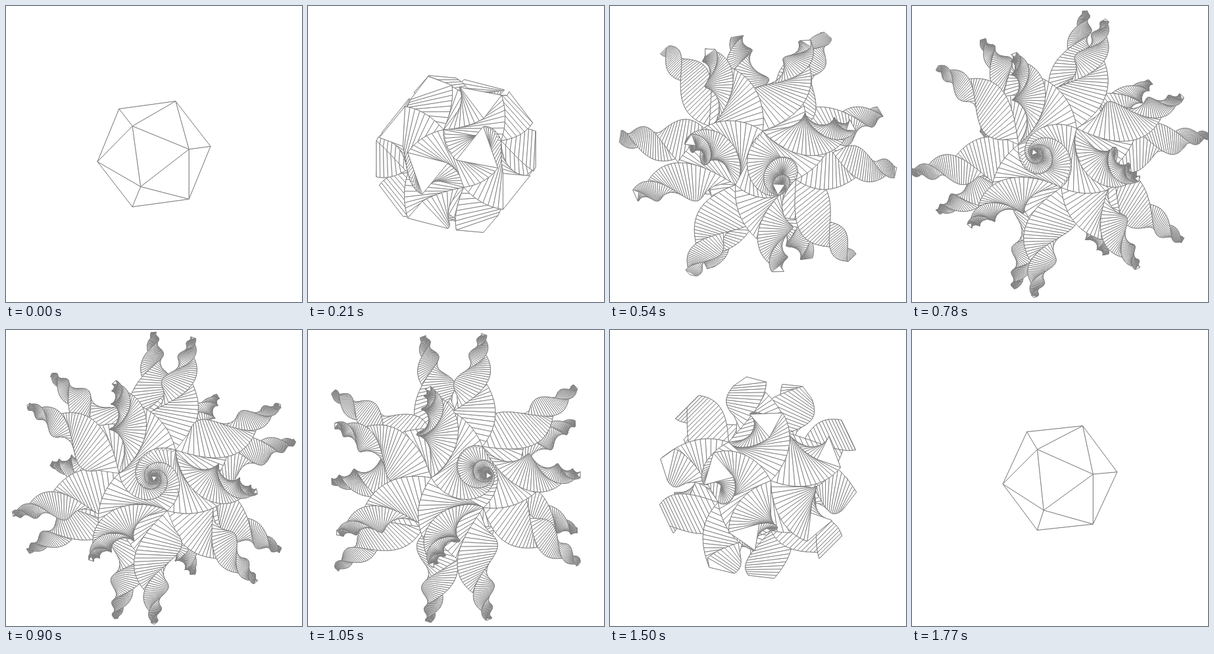
These frames come from a looping animation (450 by 450 pixels, 1800 ms). An HTML page with a canvas:

```html
<!DOCTYPE html>
<html lang="en">
<head>
<meta charset="utf-8">
<title>Twisting icosahedron</title>
<style>
  html, body { margin: 0; width: 100%; height: 100%; overflow: hidden; background: #fff; }
  canvas { display: block; width: 450px; height: 450px; }
</style>
</head>
<body>
<canvas id="stage" width="450" height="450"></canvas>
<script>
const ctx = document.getElementById('stage').getContext('2d');

const CENTER = 225;
const FRAME_MS = 30, FRAMES = 60;
const HALF_EDGE = 46.4;
const MAX_LAYERS = 60;
const SHRINK = 0.96;            // size ratio of neighbouring layers
const TWIST = Math.PI / 24;     // counterclockwise turn of each layer, seen from outside
const HEIGHT = 179.5;           // distance from a face to the apex of its horn
const PHI = (1 + Math.sqrt(5)) / 2;
const UP = Math.sqrt(2 / 3), TILT = Math.sqrt(1 / 3);   // isometric view

const add = (a, b) => a.map((x, i) => x + b[i]);
const scale = (a, k) => a.map(x => x * k);
const cross = (a, b) => [
  a[1] * b[2] - a[2] * b[1],
  a[2] * b[0] - a[0] * b[2],
  a[0] * b[1] - a[1] * b[0]
];

const vertices = [];
for (const a of [-1, 1]) for (const b of [-PHI, PHI])
  vertices.push([a, 0, b], [b, a, 0], [0, b, a]);

const isEdge = (a, b) => Math.abs(Math.hypot(...add(a, scale(b, -1))) - 2) < 0.01;

function makeHorn(corners) {
  const sum = corners.reduce(add);
  const normal = scale(sum, 1 / Math.hypot(...sum));
  const base = scale(sum, HALF_EDGE / 3);
  const spokes = corners.map(c => add(scale(c, HALF_EDGE), scale(base, -1)));
  const layers = [];
  for (let k = 0; k <= MAX_LAYERS; k++) {
    const size = SHRINK ** k;
    const middle = add(base, scale(normal, HEIGHT * (1 - size)));
    const cos = size * Math.cos(k * TWIST), sin = size * Math.sin(k * TWIST);
    layers.push(spokes.map(s =>
      add(middle, add(scale(s, cos), scale(cross(normal, s), sin)))));
  }
  return { normal, layers };
}

const horns = [];
vertices.forEach((a, i) => vertices.forEach((b, j) => vertices.forEach((c, k) => {
  if (i < j && j < k && isEdge(a, b) && isEdge(b, c) && isEdge(a, c))
    horns.push(makeHorn([a, b, c]));
})));

// Returns screen offset x, y and depth towards the viewer.
function project([x, y, z], cos, sin) {
  const away = x * sin + y * cos;
  return [x * cos - y * sin, -UP * z - TILT * away, TILT * z - UP * away];
}

function drawPolygon(points) {
  ctx.beginPath();
  for (const [x, y] of points) ctx.lineTo(CENTER + x, CENTER + y);
  ctx.closePath();
  ctx.fill();
  ctx.stroke();
}

const depthOf = points => points.reduce((sum, p) => sum + p[2], 0);

function drawSlab(low, high) {
  [0, 1, 2]
    .map(i => [low[i], low[(i + 1) % 3], high[(i + 1) % 3], high[i]])
    .sort((a, b) => depthOf(a) - depthOf(b))
    .forEach(drawPolygon);
}

function drawHorn({ layers, depth }, count, cos, sin) {
  const rings = layers.slice(0, count + 1)
    .map(ring => ring.map(p => project(p, cos, sin)));
  if (depth > 0) {
    for (let k = 0; k < count; k++) drawSlab(rings[k], rings[k + 1]);
    drawPolygon(rings[count]);
  } else {
    drawPolygon(rings[count]);
    for (let k = count - 1; k >= 0; k--) drawSlab(rings[k], rings[k + 1]);
  }
}

function draw(frame) {
  const progress = frame / FRAMES;
  const angle = Math.PI * (0.25 + progress);
  const cos = Math.cos(angle), sin = Math.sin(angle);
  const count = Math.round(MAX_LAYERS * Math.sin(Math.PI * progress) ** 2);

  ctx.fillStyle = '#fff';
  ctx.fillRect(0, 0, 450, 450);
  ctx.strokeStyle = '#7c7c7c';
  ctx.lineWidth = 0.9;
  ctx.lineJoin = 'bevel';

  // Horns lie in separate cones around the centre, so their axes give the paint order.
  horns
    .map(({ normal, layers }) => ({ layers, depth: project(normal, cos, sin)[2] }))
    .sort((a, b) => a.depth - b.depth)
    .forEach(horn => drawHorn(horn, count, cos, sin));
}

let shown = 0;
function tick() {
  const frame = Math.floor(performance.now() / FRAME_MS) % FRAMES;
  if (frame !== shown) draw(shown = frame);
  requestAnimationFrame(tick);
}
draw(0);
requestAnimationFrame(tick);
</script>
</body>
</html>
```
